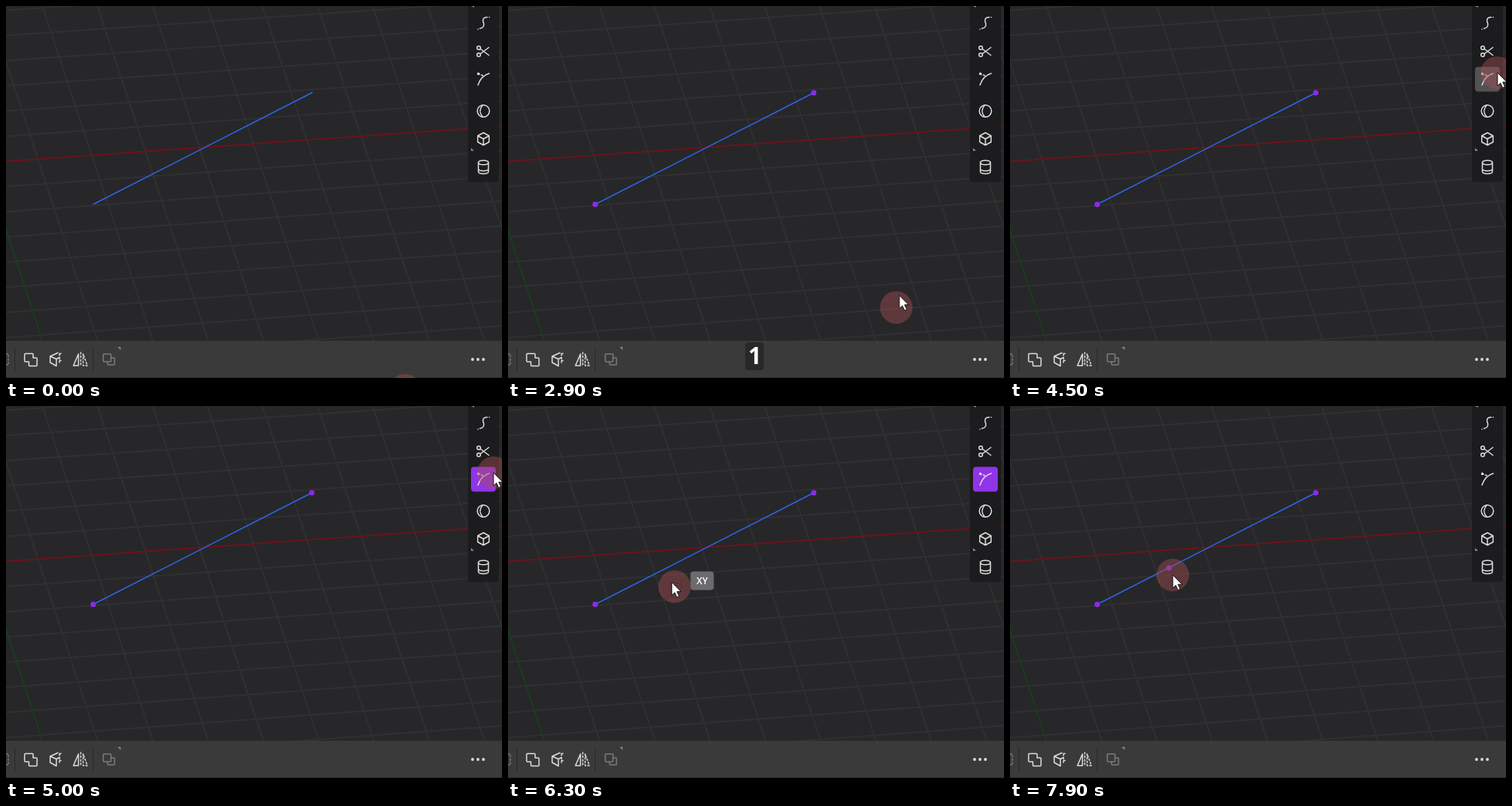
An HTML page for the animation above (8 s loop, 640 by 480 pixels).

```html
<!DOCTYPE html>
<html lang="en">
<head>
<meta charset="utf-8">
<title>Placing a point on a line</title>
<style>
  html, body { margin: 0; width: 100%; height: 100%; overflow: hidden; background: #272729; }
  svg { display: block; width: 640px; height: 480px; }
  .icon { fill: none; stroke: #dcdcdc; stroke-width: 1.5; stroke-linecap: round; stroke-linejoin: round; }
  .dim { stroke: #7b7b7b; }
  .fill { fill: #dcdcdc; stroke: none; }
  .corner { fill: #858585; }
  .dash { stroke-dasharray: 2 2.6; }
  .knot { fill: #8b2be6; }
  text { fill: #fff; text-anchor: middle; }
  #label text { font: 600 12px "Open Sans", "Noto Sans", sans-serif; }
  #key text { font: 700 30px "Open Sans", "Noto Sans", sans-serif; }
</style>
</head>
<body>
<svg viewBox="0 0 640 480">
  <rect width="640" height="480" fill="#272729"/>
  <g id="grid" stroke-width="2"></g>
  <path d="M112.500 256 395.500 111.500" stroke="#2b67ea" stroke-width="1.500"/>
  <g id="ends">
    <circle class="knot" cx="112.500" cy="256" r="3.500"/>
    <circle class="knot" cx="394.500" cy="112" r="3.500"/>
    <circle id="ring" cx="394.500" cy="112" r="1.400" fill="#31313b"/>
  </g>
  <circle id="added" class="knot" cx="205" cy="209" r="3.500"/>
  <g id="gizmo" fill="none" stroke="#131315">
    <ellipse rx="9" ry="5"/>
    <ellipse rx="3" ry="1.800"/>
  </g>

  <!-- side toolbar -->
  <path d="M596 0h40v223q0 4-4 4h-32q-4 0-4-4z" fill="#1c1c1e"/>
  <rect id="tool" x="600" y="78.500" width="32" height="32" rx="4"/>
  <path class="corner" d="M600 0h4v2zM600 183v4h4z"/>
  <g class="icon">
    <path d="M621 14.500q-5.500 0-5.500 4 0 2 1 4 1 5.500-5 6.500"/>
    <path d="M623.500 14.500h.1M609 30h.1"/>
    <circle cx="610" cy="54" r="2.300"/><circle cx="610" cy="63" r="2.300"/>
    <path d="M612.300 61.500 623 53.500M612.300 55.500 623 63.500"/>
    <path d="M609 102q4-12 14.500-15"/>
    <path class="dash" d="M609 87.500l7 2.500"/>
    <circle cx="609.500" cy="87.500" r="1"/>
    <circle cx="616" cy="135.500" r="7.800"/>
    <path d="M615 128q-6.500 7.500 0 15"/>
    <path d="M616 163.500l7.300 4v8l-7.300 4-7.300-4v-8zM608.700 167.500l7.300 4 7.300-4M616 171.500v8"/>
    <ellipse cx="616" cy="202" rx="6.500" ry="2.800"/>
    <path d="M609.500 202v11.500c0 4 13 4 13 0V202M609.500 210c0 3.500 13 3.500 13 0"/>
  </g>

  <!-- bottom bar -->
  <rect y="432" width="640" height="48" fill="#3a3a3a"/>
  <rect y="479" width="640" height="1" fill="#302a2b"/>
  <path d="M11.500 440v32M112.500 440v32" stroke="#2a2a2a"/>
  <path class="corner" d="M144 440h4v4z"/>
  <g class="icon">
    <path class="dim dash" d="M0 449h3v14H0"/>
    <path d="M25 448.500h9q1 0 1 1v4.500h4q1 0 1 1v8.500q0 1-1 1h-8.500q-1 0-1-1V459H25q-1 0-1-1v-8.500q0-1 1-1z"/>
    <path d="M67 447.500l-10 4.500v8l8 4.500v-9l-8-3.500M65 455.500l4-2"/>
    <path class="dash" d="M69 448.500h4M69 457.500h4M69 449v11"/>
    <path d="M93.500 449v15H87z"/>
    <path class="dash" d="M96.500 447v18"/>
    <path class="dash" d="M99.500 449v15H105z"/>
    <path class="dim" d="M126.500 449h8q1 0 1 1v8q0 1-1 1h-8q-1 0-1-1v-8q0-1 1-1zM131 459.500v2.500q0 1 1 1h7q1 0 1-1v-7q0-1-1-1h-3"/>
  </g>
  <g class="fill">
    <circle cx="602" cy="456" r="1.900"/><circle cx="609" cy="456" r="1.900"/><circle cx="616" cy="456" r="1.900"/>
  </g>

  <g id="key">
    <rect x="306" y="434" width="24" height="36" rx="4" fill="#282828"/>
    <text x="318.500" y="462">1</text>
  </g>
  <g id="label">
    <rect x="20" y="-19.500" width="30" height="24" rx="4" fill="#6c6c6e"/>
    <text x="35" y="-3">XY</text>
  </g>
  <circle id="halo" r="21" fill="rgb(164,78,82)" fill-opacity=".45"/>
  <path id="dots" d="M-32-5.500H0" stroke="#a87a7c" stroke-dasharray="1 1.500"/>
  <path id="arrow" d="M0 0V17l3.900-3.600 2.800 6.100 2.900-1.300-2.800-6H12z" fill="#fff" stroke="#111" stroke-width="1"/>
</svg>

<script>
const LOOP = 8000, STEP = 100;
const $ = id => document.getElementById(id);

// Each sweep bends from the last resting place past a control point; power sets the ease-out.
const rest = [515, 496];
const sweeps = [
  { from: 500, to: 1200, via: [478, 430], end: [501, 389], power: 1.5 },
  { from: 2850, to: 3800, via: [540, 240], end: [525, 119], power: 1 },
  { from: 3800, to: 4500, via: [560, 86], end: [629, 86], power: 2 },
  { from: 5350, to: 6250, via: [422, 213], end: [215, 233], power: 1.9 },
  { from: 6275, to: 6700, via: [181, 182], end: [210, 218], power: 1 }
];

function pointer(t) {
  let start = rest;
  for (const { from, to, via, end, power } of sweeps) {
    if (t <= from) return start;
    if (t < to) {
      const s = 1 - (1 - (t - from) / (to - from)) ** power, r = 1 - s;
      return start.map((a, i) => r * r * a + 2 * r * s * via[i] + s * s * end[i]);
    }
    start = end;
  }
  return start;
}

function line(x1, y1, x2, y2, color) {
  const el = document.createElementNS("http://www.w3.org/2000/svg", "path");
  el.setAttribute("d", `M${x1} ${y1}L${x2} ${y2}`);
  el.setAttribute("stroke", color);
  $("grid").append(el);
}

function drawGrid() {
  const gray = "#303032";
  for (let k = -6; k <= 10; k++) {
    if (k) line(0, 200.5 + 32.5 * k, 640, 155 + 32.2 * k, gray);
  }
  for (let k = 1; k <= 11; k++) line(-95 + 71 * k, 0, 47 + 71.3 * k, 432, gray);
  line(0, 200.5, 640, 155, "#6b131a");
  line(-95, 0, 47, 432, "#163f1c");
}

const place = (id, [x, y]) => $(id).setAttribute("transform", `translate(${x} ${y})`);
const show = (id, on) => $(id).setAttribute("visibility", on ? "visible" : "hidden");

function draw(t) {
  const tip = pointer(t), trail = pointer(t - 75);
  const active = t >= 4900 && t < 7400;
  const hover = tip[0] >= 600 && tip[1] < 111;
  const near = t >= 5600 && t < 5800;

  place("arrow", tip);
  place("halo", pointer(t - 50));
  for (const id of ["gizmo", "label", "dots"]) place(id, trail);

  show("ends", t >= 2200);
  $("ring").setAttribute("opacity", near ? 1 : 0);
  show("dots", near);
  show("gizmo", active && trail[0] < 590);
  show("label", active);
  show("added", t >= 7400);
  $("tool").setAttribute("fill", active ? "#9034e8" : hover ? "#525254" : "none");
  $("key").setAttribute("opacity", t < 2200 ? 0 : Math.max(0, Math.min(1, (3600 - t) / 200)));
}

drawGrid();
const start = performance.now();
(function tick() {
  const t = (performance.now() - start) % LOOP;
  draw(Math.floor(t / STEP) * STEP);
  requestAnimationFrame(tick);
})();
</script>
</body>
</html>
```
